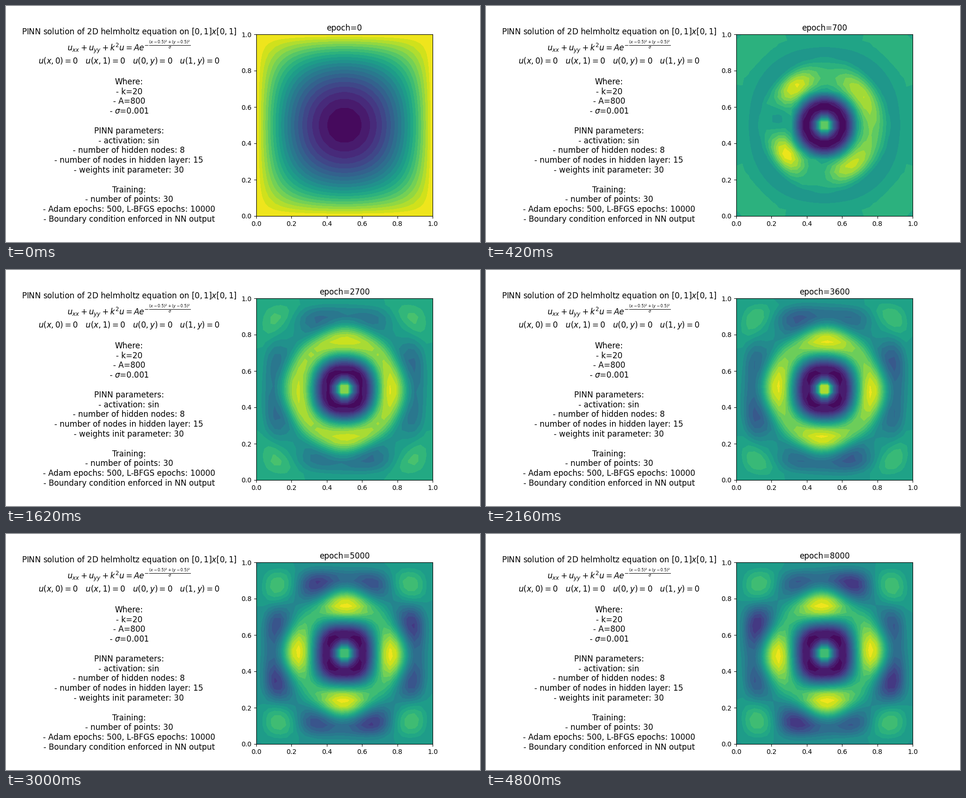
A matplotlib script that plays this animation: 1000x500 px, repeating every 4860 ms.

```python
import numpy as np
import matplotlib.pyplot as plt
from matplotlib.animation import FuncAnimation

FRAMES, INTERVAL, N = 81, 60, 30
K, A, SIGMA = 20, 800, 0.001

NOTES = r"""PINN solution of 2D helmholtz equation on $[0,1]x[0,1]$
$u_{xx}+u_{yy}+k^2u=Ae^{-\frac{(x-0.5)^2+(y-0.5)^2}{\sigma}}$
$u(x,0)=0 \quad u(x,1)=0 \quad u(0,y)=0 \quad u(1,y)=0$

Where:
- k=20
- A=800
- $\sigma$=0.001

PINN parameters:
- activation: sin
- number of hidden nodes: 8
- number of nodes in hidden layer: 15
- weights init parameter: 30

Training:
- number of points: 30
- Adam epochs: 500, L-BFGS epochs: 10000
- Boundary condition enforced in NN output"""

axis = np.linspace(0, 1, N)
X, Y = np.meshgrid(axis, axis)
DX, DY = X - 0.5, Y - 0.5
R, THETA = np.hypot(DX, DY), np.arctan2(DY, DX)
WALL = np.tanh(X * (1 - X) / 0.1) * np.tanh(Y * (1 - Y) / 0.1)


def bell(d, width):
    return np.exp(-(d / width) ** 2)


def lean(degrees, folds=1):
    """Angular cosine that peaks in the given direction."""
    return np.cos(folds * (THETA - np.radians(degrees)))


def eigen_solution():
    """Sine series of the Helmholtz solution on the unit square."""
    u = np.zeros_like(X)
    for m in range(1, 32, 2):
        for n in range(1, 32, 2):
            lam = np.pi ** 2 * (m * m + n * n)
            c = 4 * A * np.pi * SIGMA * np.exp(-lam * SIGMA / 4) / (lam - K * K)
            u += c * np.cos(m * np.pi * DX) * np.cos(n * np.pi * DY)
    return u


def radial_wave():
    """Free-space wave (Bessel asymptote), softened at the centre."""
    z = K * np.hypot(R, 0.023)
    wave = -0.628 * np.sqrt(2 / (np.pi * z)) * np.sin(z - np.pi / 4)
    return wave * WALL


def broken_ring(wave):
    """The bright crest split into four uneven arcs, fading outwards."""
    gaps = (1 - lean(37, 4)) / 2 * (0.75 + 0.5 * lean(190))
    gain = 0.88 + 0.14 * lean(190) - gaps
    crest = (R > 0.19) & (wave > 0)
    return np.where(crest, gain, 1) * wave * bell(np.maximum(R - 0.27, 0), 0.15)


def settled_field(wave):
    near_x, near_y = bell(np.abs(DX) - 0.38, 0.1), bell(np.abs(DY) - 0.38, 0.1)
    sides = near_x * bell(DY, 0.15) + near_y * bell(DX, 0.15)
    corners = 1 - 0.25 * near_x * near_y
    return WALL * (0.9 * corners * eigen_solution() - 0.06 * sides) + 0.15 * wave


wave = radial_wave()
start = -X * (1 - X) * Y * (1 - Y)
early = broken_ring(wave)
settled = settled_field(wave)
rounded = wave * (1 - 0.85 * np.sin(2 * THETA) ** 2 * bell(R - 0.42, 0.06))
squaring = 0.55 * settled + 0.45 * rounded + 0.18 * bell(R, 0.035)
ringed = 0.4 * early + 0.35 * rounded + 0.25 * settled
twist = (np.sin(2 * np.pi * X) * np.sin(4 * np.pi * Y)
         - np.sin(4 * np.pi * X) * np.sin(2 * np.pi * Y))

STAGES = [(0, start), (7, early), (18, ringed), (36, squaring), (50, settled)]
TIMES = [t for t, _ in STAGES]


def solution(i):
    weights = [np.interp(i, TIMES, row) for row in np.eye(len(STAGES))]
    turn = np.interp(i, [18, 36, 50, 64], [0, 0.015, 0.015, -0.03])
    return sum(w * u for w, (_, u) in zip(weights, STAGES)) + turn * twist


fig = plt.figure(figsize=(10, 5), dpi=100)
fig.text(0.2595, 0.495, NOTES, fontsize=12, ha="center", va="center")
ax = fig.add_axes([0.528, 0.11, 0.372, 0.77])


def update(i):
    ax.clear()
    ax.contourf(X, Y, solution(i), 20)
    ax.set_title(f"epoch={i * 100}")
    return []


anim = FuncAnimation(fig, update, frames=FRAMES, interval=INTERVAL,
                     init_func=lambda: [], repeat=True, repeat_delay=0)
plt.show()
```
